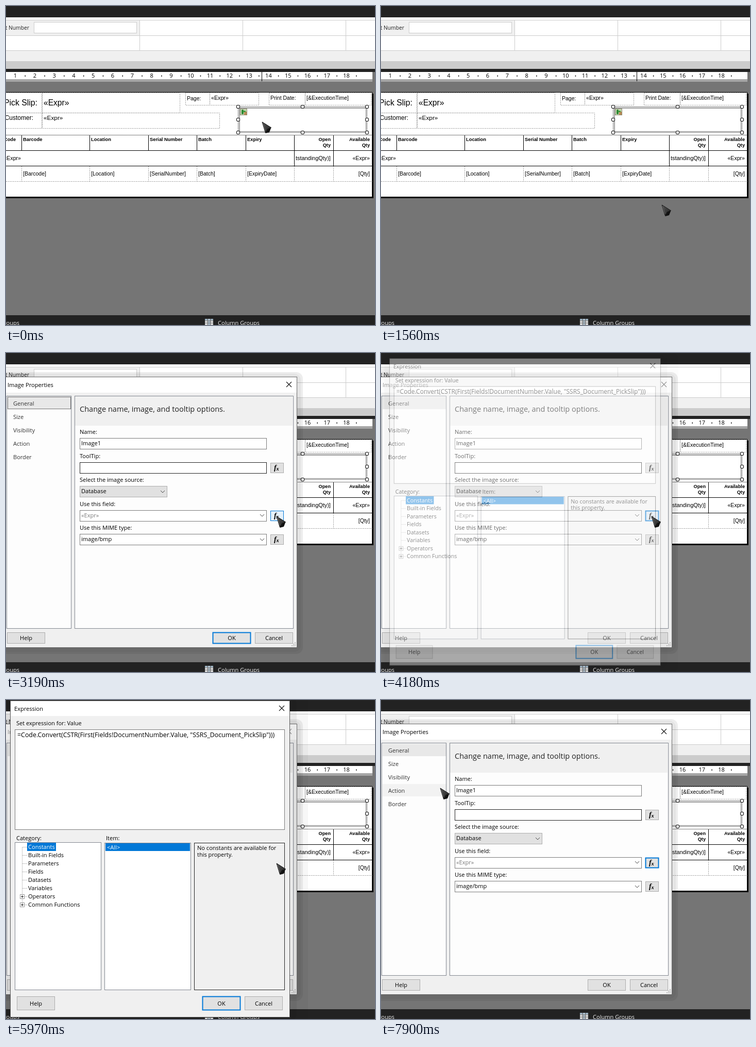
An HTML page for the animation above (8000 ms loop, 716 px wide and 619 px high).

```html
<!DOCTYPE html>
<html lang="en">
<head>
<meta charset="utf-8">
<title>Report designer</title>
<style>
html, body { margin: 0; width: 100%; height: 100%; overflow: hidden; background: #757575; }
svg { display: block; width: 716px; height: 619px; }
text { white-space: pre; }
.ui { font-family: "Open Sans", "Noto Sans", sans-serif; }
.rep { font-family: "Liberation Sans", Arial, sans-serif; }
.fx { font: italic bold 14px "Liberation Serif", serif; }
</style>
</head>
<body>
<svg id="stage" viewBox="0 0 716 619" xmlns="http://www.w3.org/2000/svg"></svg>
<script>
const LOOP = 8000, STEP = 120;
const BLUE = '#0078d7', GRAY = '#adadad', FACE = '#e1e1e1', HOT = '#e5f1fb';
const END = 'text-anchor="end"', MID = 'text-anchor="middle"', BOLD = 'font-weight="700"';
const DASH = 'stroke-dasharray="2 1.5"', DOTS = 'stroke-dasharray="1 1"';

// ---- drawing helpers ----
const fill = (x, y, x2, y2, c, extra = '') =>
  `<rect x="${x}" y="${y}" width="${x2 - x}" height="${y2 - y}" fill="${c}" ${extra}/>`;
const box = (x, y, x2, y2, c, line, extra = '') =>
  fill(x + .5, y + .5, x2 - .5, y2 - .5, c, `stroke="${line}" ${extra}`);
const path = (d, c, extra = '') => `<path d="${d}" fill="none" stroke="${c}" ${extra}/>`;
const hline = (x, x2, y, c, extra) => path(`M${x} ${y + .5}H${x2}`, c, extra);
const vline = (x, y, y2, c, extra) => path(`M${x + .5} ${y}V${y2}`, c, extra);
const ui = (x, y, s, extra = '', size = 11.05) =>
  `<text class="ui" x="${x}" y="${y}" font-size="${size}" ${extra}>${s}</text>`;
const rep = (x, y, s, size = 10.5, extra = '') =>
  `<text class="rep" x="${x}" y="${y}" font-size="${size}" ${extra}>${s}</text>`;
const each = (list, f) => list.map(f).join('');
const times = (n, f) => Array.from({ length: n }, (_, i) => f(i)).join('');

const button = (x, y, w, h, label, id) =>
  box(x, y, x + w, y + h, FACE, GRAY, `id="${id}"`) + ui(x + w / 2, y + h / 2 + 4, label, MID);
const cross = (x, y, id) =>
  path(`M${x - 5} ${y - 5}l10 10M${x + 5} ${y - 5}l-10 10`, '#111', `stroke-width="1.1" id="${id}"`);
const chevron = (x, y) => path(`M${x - 4} ${y - 2}l4 4l4 -4`, '#444');
const shadow = (x, y, x2, y2, alpha) => fill(x, y, x2, y2, '#000', `rx="13" opacity="${alpha}"`);

// ---- designer surface ----
function toolbar() {
  return fill(0, 0, 716, 128, '#222') + fill(0, 22, 716, 87, '#fff') +
    fill(0, 28, 259, 57, '#f0f0f0') + fill(0, 87, 716, 107, '#f0f0f0') + fill(0, 107, 716, 122, '#ccc') +
    each([27, 57, 86], y => hline(0, 716, y, '#ccc')) +
    times(3, i => vline(259 + 200 * i, 27, 87, '#ccc')) +
    box(54, 31, 254, 53, '#fff', '#ccc') + ui(45, 46, 'Document Number', END + ' fill="#222"', 10.3);
}

function ruler() {
  return fill(0, 128, 711, 142, '#fff') + fill(0, 142, 711, 147, '#a6a6a6') +
    times(18, i => {
      const x = 18 + 37.8 * i;
      return ui(x, 139, i + 1, MID) + fill(x + 18.5, 134.5, x + 20, 137, '#222');
    }) + vline(496, 128, 146, '#000');
}

function pageHeader() {
  const cell = (x, y, x2, y2, label, size = 10.5, drop = 14) =>
    box(x, y, x2 + 1, y2 + 1, 'none', '#999', DASH) + rep(x + 3, y + drop, label, size);
  const titleCell = (y, y2, label, size, base) =>
    box(-5, y, 70, y2 + 1, 'none', '#999', DASH) + rep(size > 14 ? 61 : 53, base, label, size, END);
  return titleCell(168, 207, 'Pick Slip:', 15.8, 193) + cell(70, 168, 337, 207, '«Expr»', 15.6, 25) +
    titleCell(207, 237, 'Customer:', 12, 221) + cell(70, 207, 414, 237, '«Expr»', 11.8) +
    cell(348, 168, 395, 192, 'Page:', 10.5, 15) + cell(395, 168, 490, 192, '«Expr»', 10.7) +
    cell(510, 168, 580, 192, 'Print Date:') + cell(580, 168, 708, 192, '[&amp;ExecutionTime]');
}

function selectedImage() {
  return box(453, 198, 699, 244, '#fff', '#999') + box(450, 195, 701, 246, 'none', '#000', DOTS) +
    box(452, 197, 699, 244, 'none', '#555', DOTS) +
    box(454, 199, 468, 212, '#c9d8b6', '#8a8a70') + fill(462, 205, 467, 211, '#b98a55') +
    fill(457, 201, 461, 210, '#2d8a34', 'rx="1.5"') + fill(461, 203, 465, 206, '#3f9f3c', 'rx="1"') +
    times(9, i => {
      const x = 450 + 125 * (i % 3), y = 195 + 25 * Math.floor(i / 3);
      return i === 4 ? '' : box(x - 3, y - 3, x + 4, y + 4, '#fff', '#000', 'rx="1.5"');
    });
}

function table() {
  const cols = [30, 162, 276, 370, 465, 559, 635];
  const names = ['Barcode', 'Location', 'Serial Number', 'Batch', 'Expiry'];
  const head = (x, y, s) => rep(x, y, s, 9.2, END + ' ' + BOLD);
  return hline(0, 711, 250, '#000', DOTS) + hline(0, 711, 280, '#000') +
    hline(0, 711, 310, '#000') + hline(0, 711, 340, '#999', DASH) +
    each(cols, (x, i) => vline(x, 251, i > 4 ? 310 : 280, '#000') + vline(x, 311, 340, '#999', DASH)) +
    each(names, (n, i) => rep(cols[i] + 3, 262, n, 9.35, BOLD) +
      rep(cols[i] + 3, 329, `[${n.replace(' ', '').replace('Expiry', 'ExpiryDate')}]`)) +
    head(19, 262, 'Item Code') + head(630, 262, 'Open') + head(630, 273, 'Qty') +
    head(706, 262, 'Available') + head(706, 273, 'Qty') +
    rep(29, 299, '«Expr»', 10.6, END) + rep(562, 299, 'tstandingQty)]', 10.9) +
    rep(706, 299, '«Expr»', 10.6, END) + rep(706, 329, '[Qty]', 10.5, END);
}

function groupBar() {
  return fill(0, 600, 716, 619, '#222') + ui(26, 619, 'Row Groups', END + ' fill="#eee"') +
    ui(411, 619, 'Column Groups', 'fill="#eee"') + fill(386, 607, 402, 619, '#e8e8e8') +
    fill(386, 607, 402, 610, '#9fb4c4') + fill(391, 607, 396, 619, '#b5c9d8') +
    times(2, i => vline(391 + 5 * i, 607, 619, '#555')) + times(3, i => hline(386, 402, 610 + 3 * i, '#777'));
}

const surface = () => fill(0, 0, 716, 619, '#757575') + toolbar() + ruler() +
  fill(0, 167, 713, 373, '#000') + fill(711, 167, 713, 170, '#757575') + fill(0, 168, 710, 370, '#fff') +
  pageHeader() + selectedImage() + table() + groupBar();

// ---- context menu ----
function menu() {
  let y = 227;
  const items = ['Cut', 'Copy', 'Paste', 'Delete', '', 'Layout', 'Select', '', 'Image Properties...'];
  return fill(499, 228, 669, 402, '#000', 'opacity=".25"') + box(497, 225, 666, 398, '#1b1b1c', '#333337') +
    fill(499, 373, 664, 395, '#333334', 'id="pick"') +
    each(items, item => {
      const top = y;
      y += item ? 22 : 7;
      return item ? ui(529, top + 15, item, 'fill="#f1f1f1"') : hline(526, 663, top + 3, '#3c3c40');
    });
}

// ---- image properties ----
function imageDialog() {
  const row = i => 165 + Math.round(46.5 * i);
  const field = (i, x2, s = '', c = '#fff', line = '#7a7a7a', ink = '#000') =>
    box(143, row(i), x2, row(i) + 22, c, line) + ui(146, row(i) + 14, s, `fill="${ink}"`);
  const fx = i => box(513, row(i) + 1, 539, row(i) + 21, FACE, GRAY, `id="fx${i}"`) +
    `<text class="fx" x="520" y="${row(i) + 15}">f<tspan font-size="11" dx="-.5" dy="1">x</tspan></text>`;
  const labels = ['Name:', 'ToolTip:', 'Select the image source:', 'Use this field:', 'Use this MIME type:'];
  return shadow(-20, 37, 576, 584, .07) + shadow(-20, 40, 572, 580, .04) +
    box(-6, 46, 565, 572, '#f0f0f0', '#6b6b6b') + fill(-5, 47, 564, 77, '#fff') +
    ui(3, 66, 'Image Properties', 'id="title"', 11.16) + cross(549, 61, 'close') +
    box(1, 83, 127, 535, '#fdfdfd', '#828790') + fill(3, 85, 126, 109, '#e8e8e8') +
    box(3, 85, 126, 109, 'none', '#000', DOTS + ' id="focus"') + fill(3, 163, 126, 187, '#f2f2f2', 'id="hover"') +
    each(['General', 'Size', 'Visibility', 'Action', 'Border'], (n, i) => ui(14, 102 + 26 * i, n, 'fill="#333"')) +
    box(133, 83, 558, 535, '#fdfdfd', '#828790') + fill(134, 84, 556, 141, '#f0f0f0') +
    ui(143, 114, 'Change name, image, and tooltip options.', 'fill="#222"', 14.52) +
    each(labels, (n, i) => ui(143, row(i) - 8, n)) +
    field(0, 506, 'Image1') + field(1, 506, '', '#fff', '#222') + field(2, 313, 'Database', FACE, GRAY) +
    field(3, 506, '«Expr»', '#fff', '#7a7a7a', '#7a7a7a') + field(4, 506, 'image/bmp') +
    each([1, 3, 4], fx) + chevron(304, 269) + chevron(497, 315) + chevron(497, 362) +
    button(2, 542, 74, 22, 'Help', 'help') + button(401, 542, 74, 22, 'OK', 'ok') +
    button(483, 542, 74, 22, 'Cancel', 'cancel') +
    times(3, r => times(r + 1, c => fill(560 - 3 * c, 561 + 3 * r, 562 - 3 * c, 563 + 3 * r, '#bbb')));
}

// ---- expression editor ----
function exprDialog() {
  const tree = ['Constants', 'Built-in Fields', 'Parameters', 'Fields', 'Datasets', 'Variables',
    'Operators', 'Common Functions'];
  const plus = y => box(27, y - 4, 36, y + 5, '#fff', '#999') + hline(29, 34, y, '#222') + vline(31, y - 2, y + 3, '#222');
  return shadow(-6, -10, 586, 630, .03) + shadow(-2, -6, 564, 622, .05) +
    box(8, 1, 551, 616, '#f0f0f0', '#555') + fill(9, 2, 550, 31, '#fff') +
    ui(16, 21, 'Expression') + cross(535, 16, 'exprClose') +
    ui(20, 49, 'Set expression for: Value') + box(17, 57, 541, 252, '#fff', '#7a7a7a') +
    ui(22, 72, '=Code.Convert(CSTR(First(Fields!DocumentNumber.Value, "SSRS_Document_PickSlip")))', '', 12.38) +
    ui(20, 272, 'Category:') + ui(194, 272, 'Item:') +
    box(17, 276, 185, 563, '#fff', '#828790') + box(191, 277, 359, 563, '#fff', '#828790') +
    box(365, 277, 541, 563, '#f0f0f0', '#222', 'id="pane"') +
    vline(31, 286, 397, '#999', DOTS) + fill(41, 277, 97, 293, BLUE) +
    each(tree, (n, i) => {
      const y = 285 + 16 * i;
      return hline(32, 41, y, '#999', DOTS) + ui(43, y + 4, n, i ? '' : 'fill="#fff"') + (i > 5 ? plus(y) : '');
    }) +
    fill(193, 278, 357, 293, BLUE) + ui(196, 290, '&lt;All&gt;', 'fill="#fff"') +
    ui(371, 291, 'No constants are available for') + ui(371, 304, 'this property.') +
    button(21, 575, 74, 27, 'Help', 'exprHelp') + button(381, 575, 74, 27, 'OK', 'exprOk') +
    button(463, 575, 74, 27, 'Cancel', 'exprCancel');
}

const pointer = `<path d="M0 0L17.5 11L14 20L6.5 22Z" fill="#111"/>
  <path d="M0 0L17.5 11L10.5 13.5L6.5 21Z" fill="url(#steel)" stroke="#1a1a1a" stroke-linejoin="round"/>
  <path d="M1.5 2.5L6.2 17" stroke="#777" stroke-width=".8"/>`;

const $ = id => document.getElementById(id);
$('stage').innerHTML = `<defs><linearGradient id="steel" x1="0" y1="0" x2="1" y2="1">
  <stop offset="0" stop-color="#555"/><stop offset="1" stop-color="#222"/></linearGradient></defs>` +
  surface() + `<g id="menu">${menu()}</g><g id="image">${imageDialog()}</g>` +
  `<g id="expr">${exprDialog()}</g><g id="pointer">${pointer}</g>`;

// ---- motion ----
// progress in n equal jumps, the first one right at the start
const steps = (t, start, n) => Math.max(0, Math.min(n, Math.floor((t - start) / STEP) + 1)) / n;

// pointer legs: start, jumps, destination
const LEGS = [[790, 4, 543, 381], [1300, 1, 545, 386], [2370, 2, 476, 352], [2630, 2, 500, 333],
  [3040, 2, 525, 317], [6090, 6, 508, 581], [6840, 1, 509, 585], [7630, 3, 115, 171]];

function pointerAt(t) {
  let x = 497, y = 225;
  for (const [start, n, toX, toY] of LEGS) {
    const p = steps(t, start, n);
    x += (toX - x) * p;
    y += (toY - y) * p;
  }
  return [x, y];
}

// windows fade in while growing about their centre
function zoom(id, p) {
  const s = 1 - .0675 * (1 - p) ** 2;
  fade(id, Math.min(1, 1.27 * p));
  $(id).setAttribute('transform', `translate(279 308.5) scale(${s}) translate(-279 -308.5)`);
}
function fade(id, alpha) {
  $(id).setAttribute('opacity', alpha);
  show(id, alpha > 0);
}
function show(id, on) {
  $(id).setAttribute('display', on ? 'inline' : 'none');
}
function paint(id, hot, ring, w = 1) {
  $(id).setAttribute('fill', hot ? HOT : FACE);
  $(id).setAttribute('stroke', ring ? BLUE : GRAY);
  $(id).setAttribute('stroke-width', w);
}

function draw(t) {
  const [x, y] = pointerAt(t);
  const over = (x1, y1, x2, y2) => x > x1 && x < x2 && y > y1 && y < y2;
  $('pointer').setAttribute('transform', `translate(${x} ${y})`);
  fade('menu', steps(t, 790, 2) - steps(t, 1440, 2));
  zoom('image', steps(t, 1710, 3));
  zoom('expr', steps(t, 4180, 3) - steps(t, 6980, 3));

  const fresh = t < 4060, active = fresh || t >= 7100;
  show('pick', over(497, 373, 666, 398));
  show('focus', fresh);
  show('hover', over(3, 163, 126, 187));
  $('title').setAttribute('fill', active ? '#000' : '#999');
  $('close').setAttribute('stroke', active ? '#111' : '#999');
  const onFx = over(513, 305, 539, 325), onCancel = over(463, 575, 537, 602);
  paint('ok', false, fresh, fresh ? 2 : 1);
  paint('fx3', onFx, onFx || !fresh, fresh ? 1 : 2);
  paint('exprOk', false, true, 2);
  paint('exprCancel', onCancel, onCancel);
  $('pane').setAttribute('stroke', over(365, 277, 541, 563) ? '#222' : '#7a7a7a');
}

const start = performance.now();
function frame() {
  draw((performance.now() - start) % LOOP);
  requestAnimationFrame(frame);
}
frame();
</script>
</body>
</html>
```
